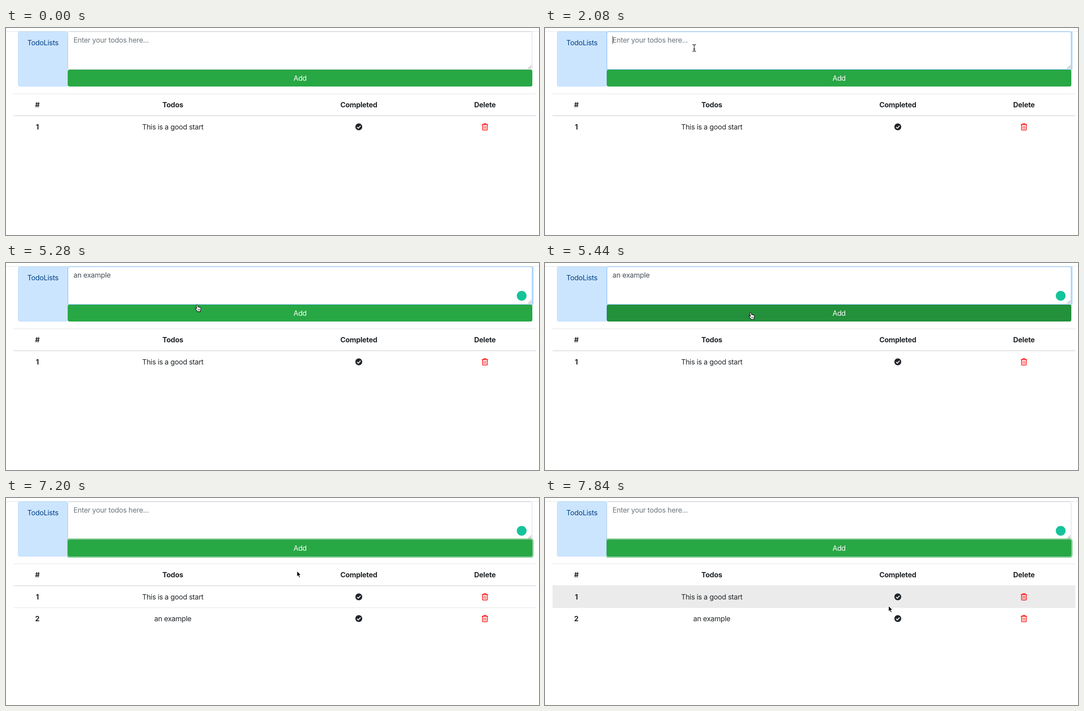
Recreate the animation shown at these times as an HTML page. Size 1200 by 467 pixels, loop 8000 ms.

```html
<!DOCTYPE html>
<html lang="en">
<head>
<meta charset="utf-8">
<title>Todo list</title>
<style>
  html, body { margin: 0; height: 100%; overflow: hidden; background: #fff; }
  svg { display: block; }
  text { font: 16px Inter, "Open Sans", sans-serif; letter-spacing: -.32px; fill: #212529; white-space: pre; }
  .mid { text-anchor: middle; }
  .bold { font-weight: 700; letter-spacing: -.25px; }
  .rule { fill: #dee2e6; }
</style>
</head>
<body>
<svg width="1200" height="467" viewBox="0 0 1200 467">
  <defs>
    <clipPath id="below"><path d="M138 8H1200V467H138Z"/></clipPath>
    <g id="done">
      <circle r="7.8" fill="#212529"/>
      <path d="M-3.8 .4L-1.1 3.1L4 -2.4" fill="none" stroke="#fff" stroke-width="2"/>
    </g>
    <g id="trash" fill="none" stroke="#f00" stroke-width="1.5">
      <path d="M-7 -5H7M-3.5 -5L-2.2 -7.3H2.2L3.5 -5M-5.4 -5V6Q-5.4 7.3 -4.1 7.3H4.1Q5.4 7.3 5.4 6V-5"/>
      <path d="M-1.8 -2.2V4.7M1.8 -2.2V4.7" stroke-width="1.3"/>
    </g>
  </defs>

  <rect class="rule" y="7" width="1200" height="1"/>
  <rect x="27.5" y="8.5" width="111" height="123" rx="3.5" fill="#cce5ff" stroke="#b8daff"/>
  <text class="mid" x="83" y="39" style="fill:#004085">TodoLists</text>

  <g clip-path="url(#below)">
    <rect id="glow" x="136" y="5" width="1052" height="92" rx="6" fill="#bfdeff"/>
    <rect id="field" x="139.5" y="8.5" width="1045" height="85" rx="3.5" fill="#fff"/>
  </g>
  <path d="M1175.5 92L1183 84.5M1179.5 92L1183 88.5" stroke="#666"/>
  <text id="hint" x="152" y="33" style="fill:#6c757d">Enter your todos here...</text>
  <text id="typed" x="152" y="33" style="fill:#495057"></text>
  <rect id="caret" y="18" width="1" height="18" fill="#333"/>
  <circle id="badge" cx="1161" cy="74" r="11" fill="#15c39a"/>

  <g clip-path="url(#below)">
    <rect id="ring" x="136" y="91" width="1052" height="44" rx="6" fill="#28a745"/>
  </g>
  <rect id="button" x="139" y="94" width="1046" height="38" rx="4"/>
  <text class="mid" x="662" y="119" style="fill:#fff">Add</text>

  <rect class="rule" x="17" y="148" width="1177" height="1"/>
  <rect class="rule" x="17" y="197" width="1177" height="2"/>
  <text class="mid bold" x="70.5" y="179">#</text>
  <text class="mid bold" x="375.5" y="179">Todos</text>
  <text class="mid bold" x="794.3" y="179">Completed</text>
  <text class="mid bold" x="1078.3" y="179">Delete</text>
  <rect id="line" class="rule" x="17" y="247" width="1177" height="1"/>
  <rect id="shade" x="17" y="197" width="1177" height="51" fill="#ebebeb"/>
  <g id="rows"></g>

  <path id="arrow" d="M.5 .5V13L3.4 10.4L5.5 15.2L7.7 14.2L5.6 9.6H9.5Z" stroke="#fff"/>
  <path id="beam" d="M-3.5 -7.5Q0 -7.5 0 -5.5Q0 -7.5 3.5 -7.5M0 -5.5V5.5M-3.5 7.5Q0 7.5 0 5.5Q0 7.5 3.5 7.5M-1.8 2.5H1.8"
    fill="none" stroke="#222" stroke-width="1.3" stroke-linecap="round"/>
  <g id="hand" stroke="#000">
    <path d="M-1.6 1.2Q-1.4 -.4 0 -.2Q1.2 0 1.4 1.4L2.1 4.6Q3.6 3.8 4.4 5.2Q5.9 4.5 6.6 6Q8.4 5.6 8.7 7.8Q9 10.6 7.6 12.8V15H.8Q.2 13 -1.8 11.2L-4 8.4Q-4.4 6.9 -3 6.9Q-1.8 7 -.4 8.4Z"
      fill="#fff" stroke-width="1.1" stroke-linejoin="round"/>
    <path d="M2.2 9.2V12.4M4.2 9.2V12.4M6.2 9.2V12.4" stroke-width=".8"/>
  </g>
</svg>
<script>
const LOOP = 8000, STEP = 160;
const ENTER = 320, FOCUS = 1920, TYPE = 3200, TYPED = 4800, HOVER = 5330, CLICK = 5750, ADDED = 5920, LEAVE = 6980;
const todo = 'an example';

const $ = id => document.getElementById(id);
const show = (id, on) => $(id).style.display = on ? '' : 'none';
const between = (t, a, b) => t >= a && t < b;
const ramp = (t, start, length = 150) => Math.min(1, Math.max(0, (t - start) / length));
const easeOut = p => 1 - (1 - p) ** 2;
const easeBoth = p => p * p * (3 - 2 * p);

// The pointer glides from one stop to the next.
const glides = [
  { start: ENTER, length: 1440, to: [336, 45], ease: easeOut },
  { start: 4960, length: 480, to: [463, 112], ease: easeBoth },
  { start: 5440, length: 480, to: [466, 117], ease: easeOut },
  { start: 6720, length: 800, to: [757, 190], ease: easeBoth },
  { start: 7520, length: 320, to: [773, 243], ease: easeBoth }
];

function pointerAt(t) {
  let x = 651, y = 213;
  for (const { start, length, to, ease } of glides) {
    const p = ease(ramp(t, start, length));
    x += (to[0] - x) * p;
    y += (to[1] - y) * p;
  }
  return [x, y];
}

const row = (id, n, name, y) => `<g id="${id}">
  <text class="mid bold" x="70.5" y="${y + 6}">${n}</text>
  <text class="mid" x="375.5" y="${y + 6}">${name}</text>
  <use href="#done" x="794.3" y="${y}"/><use href="#trash" x="1078.2" y="${y}"/></g>`;
$('rows').innerHTML = row('first', 1, 'This is a good start', 223) + row('second', 2, todo, 272);

function draw(t) {
  const added = t >= ADDED, active = t >= FOCUS;

  // Typing speeds up slightly towards the end.
  const count = t < TYPE || added ? 0
    : Math.round(1 + (todo.length - 1) * ramp(t, TYPE, TYPED - TYPE) ** 1.45);
  $('typed').textContent = todo.slice(0, count);
  show('hint', !count);
  show('caret', between(t, FOCUS, FOCUS + 480) || between(t, FOCUS + 960, TYPED + 480));
  $('caret').setAttribute('x', 152 + (count ? Math.round($('typed').getComputedTextLength()) : 0));

  const press = ramp(t, CLICK);
  const focus = ramp(t, FOCUS - 70) - press;
  const hover = ramp(t, HOVER) - ramp(t, LEAVE);
  $('glow').style.opacity = focus;
  $('field').style.stroke = `rgb(${206 - 78 * focus},${212 - 23 * focus},${218 + 37 * focus})`;
  $('ring').style.opacity = press / 2;
  $('badge').style.opacity = ramp(t, 3760, 320);
  $('button').style.fill = `rgb(${40 - 7 * hover},${167 - 31 * hover},${69 - 13 * hover})`;

  const [x, y] = pointerAt(t);
  show('line', added);
  show('second', added);
  show('shade', active && between(y, 199, 247));

  const kind = !active || y > 132 ? 'arrow' : y < 94 ? 'beam' : 'hand';
  for (const id of ['arrow', 'beam', 'hand']) show(id, t >= ENTER && id === kind);
  $(kind).setAttribute('transform', `translate(${x} ${y})`);
}

function tick(now) {
  draw(Math.floor(now % LOOP / STEP) * STEP);
  requestAnimationFrame(tick);
}
draw(0);
requestAnimationFrame(tick);
</script>
</body>
</html>
```
